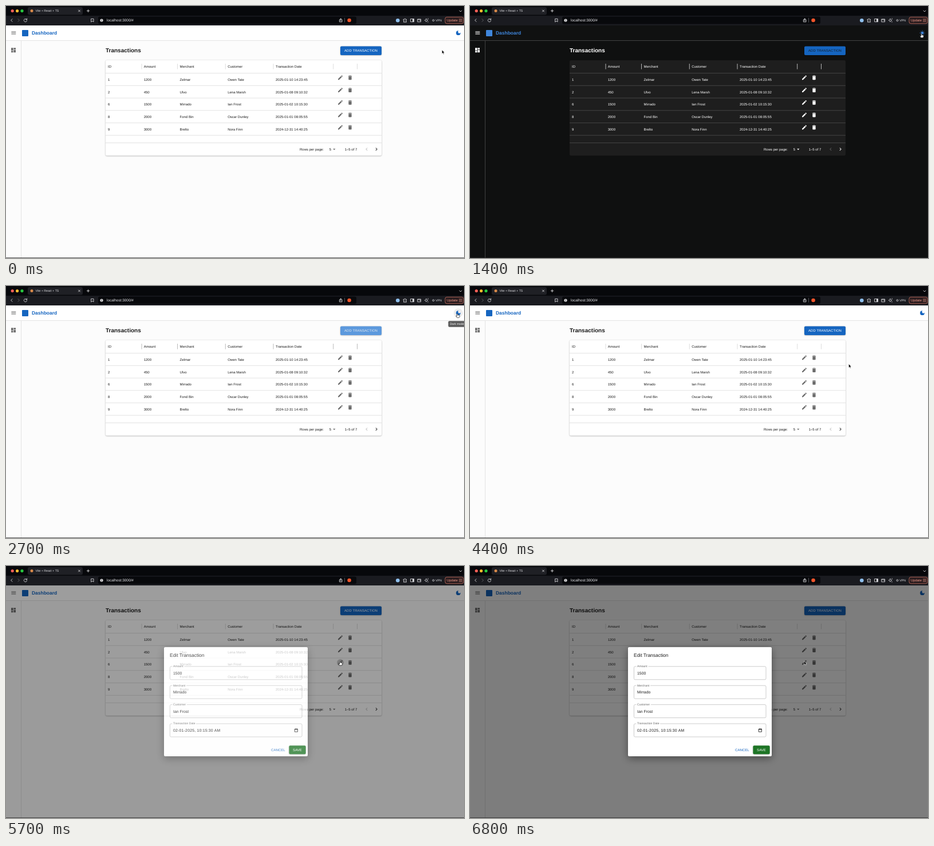
Animation, 800 px wide and 441 px high, one loop 8000 ms. Source, as an HTML page:

```html
<!DOCTYPE html>
<html lang="en">
<head>
<meta charset="utf-8">
<title>Dashboard</title>
<style>
html, body { margin: 0; width: 100%; height: 100%; overflow: hidden; background: #000; }
svg { display: block; width: 800px; height: 441px; }
text {
  font: 6px "Liberation Sans", Arial, sans-serif;
  text-rendering: geometricPrecision; white-space: pre;
}
#page {
  --bg: #fcfcfc; --bar: #fff; --card: #fff; --line: #e0e0e0; --ink: #1c1c1c;
  --icon: #6b6b6b; --off: #bdbdbd; --brand: #1565c0; --hover: rgba(0,0,0,.07);
}
#page.dark {
  --bg: #0f1010; --bar: #101111; --card: #1e1e1e; --line: #484848; --ink: #fff;
  --icon: #fff; --off: #606060; --brand: #3f86dc; --hover: rgba(255,255,255,.11);
}
#page text { fill: var(--ink); }
#page .brand { fill: var(--brand); }
.line { stroke: var(--line); fill: none; }
.icon { fill: var(--icon); }
.ink { fill: var(--ink); }
.off { fill: var(--off); }
.bold { font-weight: bold; }
.tool { fill: none; stroke: #d5d5d9; stroke-width: .9; stroke-linecap: round; stroke-linejoin: round; }
#page.dark #cardShade { display: none; }
</style>
</head>
<body>
<svg id="stage" viewBox="0 0 800 441"></svg>
<script>
const LOOP = 8000, STEP = 100;
const ROWS = [
  ["1", "1200", "Zelmar", "Owen Tate", "2025-01-10 14:23:45"],
  ["2", "450", "Ulvo", "Lena Marsh", "2025-01-08 09:10:32"],
  ["6", "1500", "Mirrado", "Ian Frost", "2025-01-02 10:15:30"],
  ["8", "2000", "Fond Bin", "Oscar Dunley", "2025-01-01 08:05:55"],
  ["9", "3000", "Brelto", "Nora Finn", "2024-12-31 14:40:25"]
];
const HEADS = ["ID", "Amount", "Merchant", "Customer", "Transaction Date"];
const COLS = [178, 240.7, 303.6, 387.2, 471];
const SEPS = [237, 299.5, 383.3, 467, 571.7, 613.5];
const ICONS = {
  menu: "M3 18h18v-2H3zm0-5h18v-2H3zm0-7v2h18V6z",
  grid: "M3 13h8V3H3zm0 8h8v-6H3zm10 0h8V11h-8zm0-18v6h8V3z",
  moon: "M12 3a9 9 0 1 0 9 9c0-.46-.04-.92-.1-1.36A5.4 5.4 0 1 1 13.36 3.1C12.92 3.04 12.46 3 12 3",
  edit: "M3 17.25V21h3.75L17.81 9.94l-3.75-3.75zM20.71 7.04a1 1 0 0 0 0-1.41l-2.34-2.34a1 1 0 0 0-1.41 0l-1.83 1.83 3.75 3.75z",
  bin: "M6 19c0 1.1.9 2 2 2h8c1.1 0 2-.9 2-2V7H6zM19 4h-3.5l-1-1h-5l-1 1H5v2h14z",
  prev: "M15.41 16.59 10.83 12l4.58-4.59L14 6l-6 6 6 6z",
  next: "M8.59 16.59 13.17 12 8.59 7.41 10 6l6 6-6 6z",
  drop: "M7 10l5 5 5-5z"
};

const text = (x, y, s, size = 6, attrs = "") =>
  `<text x="${x}" y="${y}" style="font-size:${size}px" ${attrs}>${s}</text>`;
const icon = (name, x, y, cls = "icon", scale = .44) =>
  `<path class="${cls}" d="${ICONS[name]}" transform="translate(${x} ${y}) scale(${scale}) translate(-12 -12)"/>`;
const rect = (x, y, w, h, fill, r = 0, attrs = "") =>
  `<rect x="${x}" y="${y}" width="${w}" height="${h}" rx="${r}" fill="${fill}" ${attrs}/>`;
const dot = (x, y, r, fill, attrs = "") =>
  `<circle cx="${x}" cy="${y}" r="${r}" fill="${fill}" ${attrs}/>`;
const path = (d, cls, attrs = "") => `<path class="${cls}" d="${d}" ${attrs}/>`;

function browser() {
  const lights = ["#ff5f57", "#febc2e", "#28c840"].map((c, i) => dot(11.2 + i * 8.4, 8.6, 2.6, c)).join("");
  return rect(0, 0, 800, 17.5, "#07080b") + rect(0, 17, 800, 17, "#1a1b20") + lights +
    rect(38, 2, 96, 13.4, "#1f2025", 3) + dot(45, 8.5, 2.5, "#d98a4a") +
    text(51.5, 10.4, "Vite + React + TS", 5.2, 'fill="#e4e4e8"') +
    path("M126.5 7l3 3m0-3l-3 3M141.3 8.5h4.4m-2.2-2.2v4.4M792 8l2 2 2-2", "tool") +
    path("M11 22.6l-2.4 2.4 2.4 2.4", "tool") +
    path("M21 22.6l2.4 2.4-2.4 2.4", "tool", 'opacity=".4"') +
    path("M36.2 23.6a2.7 2.7 0 1 0 .4 2.2M36.6 22v2h-2", "tool") +
    path("M149 22.4h4v5.4l-2-1.6-2 1.6z", "tool") +
    rect(161, 18.6, 451, 13, "#08090c", 3) +
    dot(167, 25, 2.6, "#e6e6e8") + rect(166.6, 24.5, .8, 2, "#08090c") + rect(166.6, 23.2, .8, .8, "#08090c") +
    text(176, 27.2, "localhost:3000/#", 6.45, 'fill="#ececf0"') +
    path("M583.7 24h-1.3v3.8h4.6V24h-1.3M584.7 26v-4m-1.3 1.2l1.3-1.3 1.3 1.3", "tool", 'stroke-width=".7"') +
    rect(591, 20.8, .8, 8, "#65656b") + dot(599.6, 25, 3.3, "#f4552b") +
    dot(684.3, 25.2, 3.3, "#8fc0ee") +
    path("M694.5 23.3h1.6c-.3-1.6 2-1.6 1.7 0h1.6v1.8c-1.6-.3-1.6 2 0 1.7v1.4h-4.9v-1.5c1.6.2 1.6-1.9 0-1.6z", "tool") +
    path("M707 22.5h5.6v5.2H707z", "tool") + rect(710, 22.5, 2.6, 5.2, "#d5d5d9") +
    path("M719.2 23h5.4v4.8h-5.4zM719.2 23.9h5.4M723 25.7h1.6", "tool") +
    path("M734 22.3q.4 2.4 2.8 2.8q-2.4.4-2.8 2.8q-.4-2.4-2.8-2.8q2.4-.4 2.8-2.8M737.2 21.7v1.6M737 27v1.4", "tool", 'style="stroke-width:.75"') +
    dot(746.5, 25.2, 1.5, "none", 'stroke="#c8c8cc"') +
    text(750.2, 27, "VPN", 5.3, 'fill="#e2e2e6"') +
    rect(767, 19.4, 32, 11.4, "#2b1d1f", 3, 'stroke="#c9705f" stroke-width=".8"') +
    text(770, 27.1, "Update", 5.9, 'fill="#f19a8a"') +
    path("M791.5 23h5m-5 2.1h5m-5 2.1h5", "tool", 'style="stroke:#e79786;stroke-width:.7"');
}

function tableRow(cells, i) {
  const y = 128.6 + i * 21.75;
  return cells.map((s, c) => text(COLS[c], y + 2.2, s)).join("") +
    path(`M174 ${y + 10.7}H656`, "line", 'stroke-width=".9"') +
    icon("edit", 584, y - 3.2) + icon("bin", 601, y - 3.2);
}

function page() {
  const rays = Array.from({ length: 8 }, (_, i) =>
    `<path d="M0-3.4V-4.6" transform="rotate(${i * 45})"/>`).join("");
  return `<g id="page">` +
    rect(0, 34, 800, 407, "var(--bg)") + rect(0, 34, 800, 26.5, "var(--bar)") +
    path("M0 60.5H800M26.5 61V441", "line", 'stroke-width=".9"') +
    icon("menu", 13.3, 47.2) + icon("grid", 13, 77.2) +
    rect(28, 42, 11, 11, "var(--brand)", 1) +
    text(45, 50.4, "Dashboard", 8.45, 'class="bold brand"') +
    dot(790, 47.2, 8, "var(--hover)", 'id="modeHover"') +
    `<g id="moon">${icon("moon", 790, 47.2, "brand", .43)}</g>` +
    `<g id="sun" transform="translate(790 47.2)" stroke="#3f86dc" stroke-width=".9">${rays}` +
    dot(0, 0, 2.1, "#3f86dc") + `</g>` +
    text(174, 81, "Transactions", 10, 'class="bold"') +
    rect(584, 71, 72, 15.5, "#000", 2, 'opacity=".3" filter="url(#soft)"') +
    rect(584, 70.5, 72, 15.5, "#1565c0", 2, 'id="add"') +
    text(620, 80.4, "ADD TRANSACTION", 6, 'id="addLabel" text-anchor="middle" letter-spacing=".05"') +
    rect(174, 95.6, 482, 167, "#000", 2, 'id="cardShade" opacity=".3" filter="url(#soft)"') +
    rect(174, 95, 482, 166.7, "var(--card)", 2) +
    HEADS.map((s, c) => text(COLS[c], 107.9, s)).join("") +
    `<path id="seps" stroke-width=".9" d="${SEPS.map(x => `M${x} 101v9.6`).join("")}"/>` +
    path("M174 117.6H656M174 239.5H656", "line", 'stroke-width=".9"') +
    dot(584, 169, 6, "var(--hover)", 'id="editHover"') +
    ROWS.map(tableRow).join("") +
    text(513, 252.8, "Rows per page:") + text(564.7, 252.8, "5") + icon("drop", 573.3, 250.6) +
    text(591.7, 252.8, "1–5 of 7") + icon("prev", 630, 250.6, "off") + icon("next", 647, 250.6, "ink") +
    `</g>`;
}

function field(label, value, i) {
  const y = 175.8 + i * 33.4, w = [21, 24.5, 25.5, 41.5][i];
  return rect(286.4, y, 230.6, 23, "none", 2, 'stroke="#bfbfbf" stroke-width=".8"') +
    rect(290.5, y - 1, w, 2, "#fff") +
    text(292, y + 1.4, label, 5.1, 'fill="#666"') +
    text(292, y + 13.9, value, 6.9, `fill="#1c1c1c" ${i === 3 ? 'letter-spacing=".2"' : ""}`);
}

function dialog() {
  const [, amount, merchant, customer] = ROWS[2];
  const values = [amount, merchant, customer, "02-01-2025, 10:15:30 AM"];
  return rect(0, 34, 800, 407, "#000", 0, 'opacity=".5"') +
    rect(276, 146, 251, 191, "#000", 2, 'opacity=".4" filter="url(#wide)"') +
    `<g>` + rect(276, 142, 251, 191, "#fff", 2) +
    text(286, 158.6, "Edit Transaction", 8.45, 'fill="#1c1c1c"') +
    HEADS.slice(1).map((s, i) => field(s, values[i], i)).join("") +
    path("M504.6 285.4h4.8v4.8h-4.8zM504.6 286h4.8M505.8 284.6v.8M508.2 284.6v.8", "tool", 'style="stroke:#222"') +
    text(463, 324.1, "CANCEL", 6.1, 'fill="#1565c0"') +
    rect(494.4, 315, 29.2, 15, "#000", 2, 'opacity=".3" filter="url(#soft)"') +
    rect(494.4, 314.3, 29.2, 15, "#1e7526", 2) +
    text(509, 324.1, "SAVE", 6.1, 'fill="#fff" text-anchor="middle"') + `</g>`;
}

const stage = document.getElementById("stage");
stage.innerHTML = `<defs>
  <filter id="soft" x="-10%" y="-30%" width="120%" height="160%"><feGaussianBlur stdDeviation=".9"/></filter>
  <filter id="wide" x="-20%" y="-20%" width="140%" height="140%"><feGaussianBlur stdDeviation="7"/></filter>
  </defs>` + page() +
  `<g id="tip">${rect(772.5, 61.3, 32, 10.4, "#5c5c5c", 2)}${text(775.5, 68.4, "", 5, 'id="tipLabel" fill="#fff"')}</g>` +
  `<g id="dialog">${dialog()}</g>` + browser() + rect(0, 440.3, 800, .7, "#222") +
  `<g id="cursor" stroke-linejoin="round">
    <path id="arrow" d="M0 0V6.4L1.5 5.1 2.5 7.4 3.6 6.9 2.6 4.7H4.6Z" fill="#000" stroke="#fff" stroke-width=".5"/>
    <path id="hand" d="M-.7 .7Q0-.3.7.7V2.8Q1.4 2.2 1.9 3 2.6 2.5 3 3.3 3.9 3 3.9 4.1 4 6 3 7.4H-.9L-2.6 4.7Q-2.6 3.8-1.6 4.2L-.7 5Z" fill="#fff" stroke="#000" stroke-width=".6"/>
  </g>`;

const el = {};
stage.querySelectorAll("[id]").forEach(n => el[n.id] = n);

// Each table holds [time, ...values]; values ease between entries.
const CURSOR = [[0, 761.5, 77], [900, 788.5, 48], [3200, 788.5, 48], [4100, 673, 131],
  [4400, 661.5, 136.5], [5000, 583.5, 166.5]];
const TIP = [[900, 0], [1100, 1], [1300, 1], [1400, 0], [1800, 0], [2000, 1], [3300, 1], [3500, 0]];
const DIALOG = [[5500, 0], [5600, .22], [5700, .77], [5800, .98], [5900, 1]];
const DARKEN = [[1400, 0], [1500, .65], [1600, .95], [1700, 1], [2600, 1], [2700, .58], [2800, .15], [2900, 0]];

function at(table, t) {
  if (t <= table[0][0]) return table[0].slice(1);
  const i = table.findIndex(k => k[0] > t);
  if (i < 0) return table[table.length - 1].slice(1);
  const a = table[i - 1], b = table[i], p = (t - a[0]) / (b[0] - a[0]), e = p * p * (3 - 2 * p);
  return a.slice(1).map((v, k) => v + (b[k + 1] - v) * e);
}
const mix = (a, b, p) => `rgb(${a.map((v, i) => Math.round(v + (b[i] - v) * p))})`;
const show = (node, on) => node.style.display = on ? "" : "none";

function draw(t) {
  const dark = t >= 1400 && t < 2700;
  const [shade] = at(DARKEN, t), [x, y] = at(CURSOR, t), [tip] = at(TIP, t), [open] = at(DIALOG, t);
  const onMode = Math.hypot(x - 790, y - 47.2) < 8;
  const onEdit = Math.hypot(x - 584, y - 169) < 6 && t < 5800;

  el.page.classList.toggle("dark", dark);
  show(el.moon, !dark);
  show(el.sun, dark);
  show(el.modeHover, onMode && !(t >= 1400 && t < 1700));
  show(el.editHover, onEdit);
  el.editHover.style.fill = t >= 5500 ? "rgba(0,0,0,.2)" : "";

  el.add.style.fill = mix([21, 101, 192], [144, 190, 242], shade);
  el.addLabel.style.fill = dark ? "#14202c" : mix([255, 255, 255], [205, 215, 225], shade);
  el.seps.style.stroke = dark
    ? mix([200, 200, 200], [76, 76, 76], shade)
    : mix([218, 218, 218], [150, 150, 150], shade);

  el.tip.style.opacity = tip;
  el.tipLabel.textContent = dark ? "Light mode" : "Dark mode";
  el.dialog.style.opacity = open;
  show(el.dialog, open > 0);

  el.cursor.setAttribute("transform", `translate(${x} ${y})`);
  show(el.hand, onMode || onEdit);
  show(el.arrow, !(onMode || onEdit));
}

const start = performance.now();
function tick() {
  const t = (performance.now() - start) % LOOP;
  draw(Math.floor(t / STEP) * STEP);
  requestAnimationFrame(tick);
}
draw(0);
requestAnimationFrame(tick);
</script>
</body>
</html>
```
